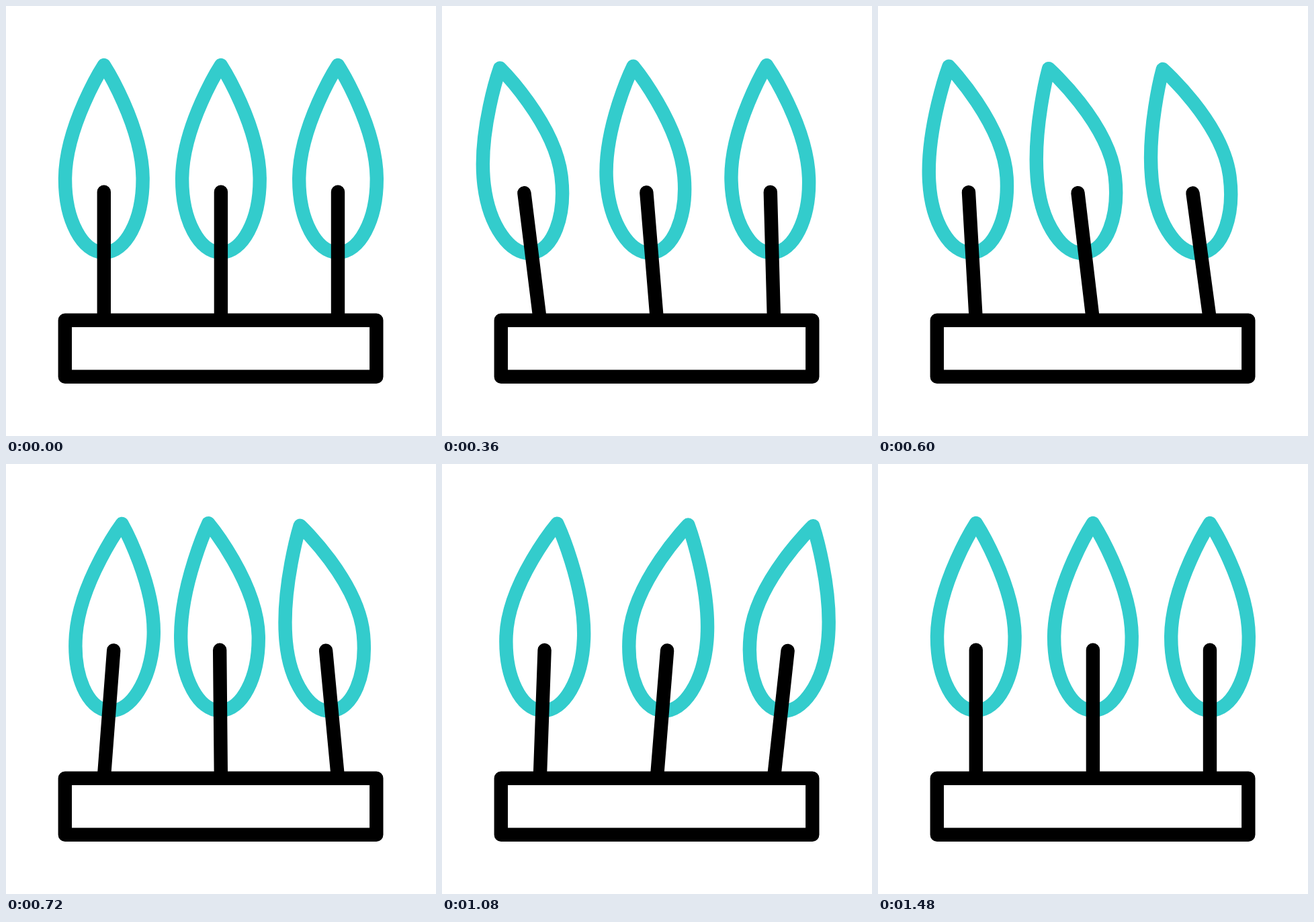
An HTML page that plays this animation: 640x640 px, repeating every 1640 ms.

```html
<!DOCTYPE html>
<html lang="en">
<head>
<meta charset="utf-8">
<title>Burner flames</title>
<style>
  html, body { margin: 0; width: 100%; height: 100%; overflow: hidden; background: #fff; }
  svg { display: block; width: 100%; height: 100%; }
  .flame, .wick, .base { fill: none; stroke: #000; stroke-width: 20.4; stroke-linecap: round; stroke-linejoin: round; }
  .flame { stroke: #3cc; }
</style>
</head>
<body>
<svg viewBox="0 0 640 640">
  <g id="burners"></g>
  <rect class="base" x="87.8" y="467.8" width="463.5" height="83.9"/>
</svg>
<script>
const LOOP = 1640, STEP = 40, STAGGER = 80, LAG = 80;
const FIRST_X = 145.8, GAP = 174.1, BASE_Y = 467;

// [time, value] pairs, eased in and out between them
const SWING = [[80, 0], [440, -7.7], [840, 6.65], [1240, 0]];
const BEND = [[80, 0], [440, -21.3], [840, 17.3], [1240, 0]];

// cubic-bezier(.5, 0, .5, 1)
function ease(p) {
  let lo = 0, hi = 1;
  for (let i = 0; i < 24; i++) {
    const m = (lo + hi) / 2;
    if (1.5 * m * (1 - m) + m ** 3 < p) lo = m; else hi = m;
  }
  return lo * lo * (3 - 2 * lo);
}

function valueAt(keys, t) {
  if (t <= keys[0][0]) return keys[0][1];
  for (let i = 1; i < keys.length; i++) {
    const [t0, a] = keys[i - 1], [t1, b] = keys[i];
    if (t < t1) return a + (b - a) * ease((t - t0) / (t1 - t0));
  }
  return keys[keys.length - 1][1];
}

// Flame outline around the burner foot; only the tip bends sideways
const flamePath = bend =>
  `M${bend} -379C${bend} -379 57.8 -289 57.8 -209` +
  `C57.8 -148 32 -100 0 -100S-57.8 -148 -57.8 -209` +
  `C-57.8 -289 ${bend} -379 ${bend} -379Z`;

function add(parent, name, attrs) {
  const el = document.createElementNS('http://www.w3.org/2000/svg', name);
  for (const key in attrs) el.setAttribute(key, attrs[key]);
  return parent.appendChild(el);
}

const root = document.getElementById('burners');
const burners = [0, 1, 2].map(i => {
  const group = add(root, 'g', {});
  const flame = add(group, 'path', { class: 'flame' });
  add(group, 'path', { class: 'wick', d: 'M0 0V-190.2' });
  return { group, flame, x: FIRST_X + i * GAP, delay: i * STAGGER };
});

function draw(now) {
  const t = Math.floor((now % LOOP) / STEP) * STEP;
  for (const { group, flame, x, delay } of burners) {
    const angle = valueAt(SWING, t - delay);
    group.setAttribute('transform', `translate(${x} ${BASE_Y}) rotate(${angle.toFixed(3)})`);
    flame.setAttribute('d', flamePath(valueAt(BEND, t - delay - LAG).toFixed(2)));
  }
}

const start = performance.now();
function tick() {
  draw(performance.now() - start);
  requestAnimationFrame(tick);
}
tick();
</script>
</body>
</html>
```
